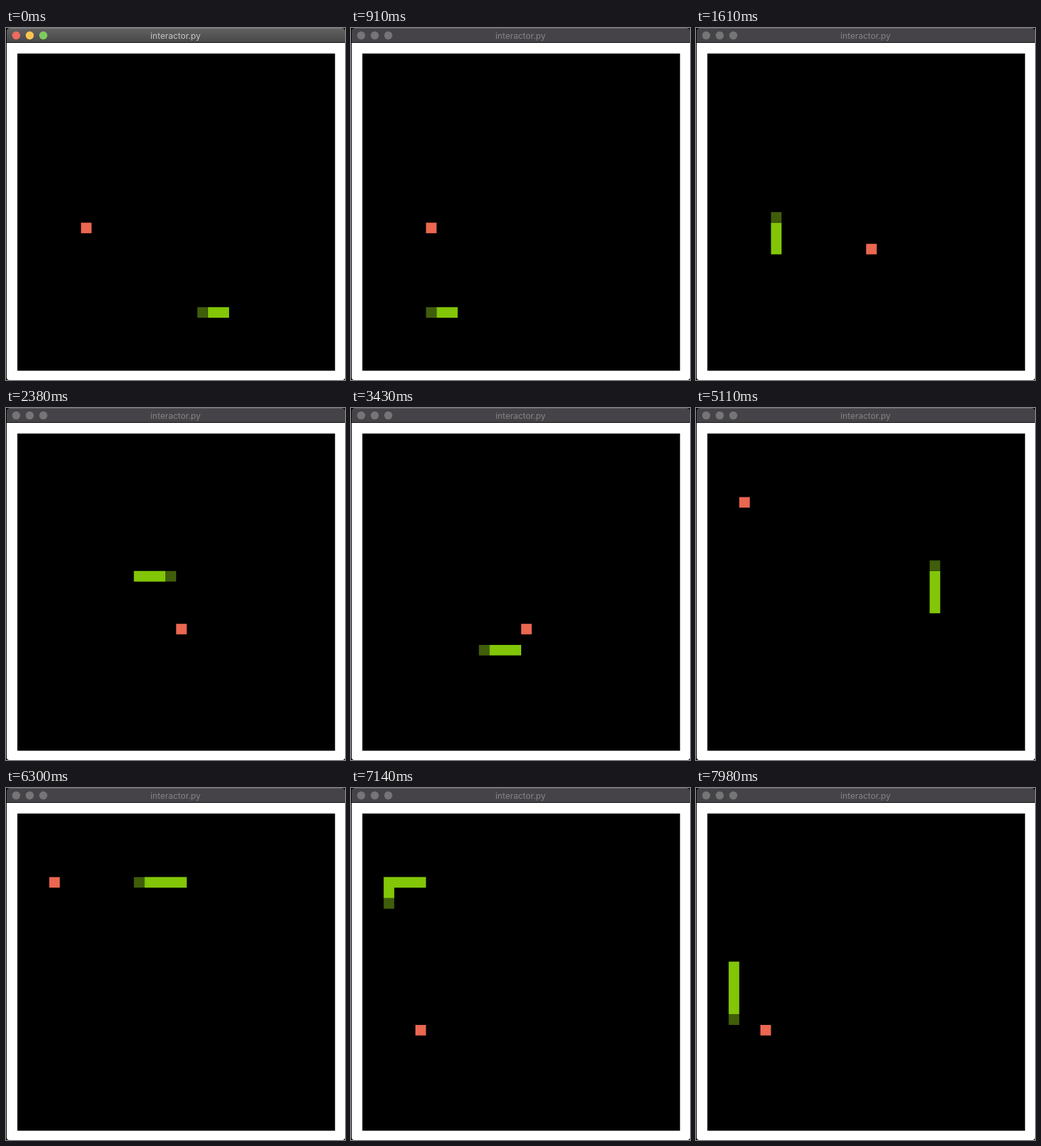
These frames come from a looping animation (500 by 520 pixels, 8000 ms). An HTML page:

```html
<!DOCTYPE html>
<html lang="en">
<head>
<meta charset="utf-8">
<title>interactor.py</title>
<style>
  html, body { margin: 0; width: 100%; height: 100%; overflow: hidden; background: #000; }
  svg { display: block; width: 500px; height: 520px; }
  text { font: 12.5px Inter, Roboto, sans-serif; text-anchor: middle; fill: #c6c6c6; }
  #bar { fill: url(#shine); }
  .idle #bar { fill: #454347; }
  .idle #edge { stroke: #636165; }
  .idle text { fill: #848385; }
  .idle circle { fill: #757477; }
</style>
</head>
<body>
<svg id="window" viewBox="0 0 500 520">
  <defs>
    <linearGradient id="shine" x2="0" y2="1">
      <stop stop-color="#626262"/>
      <stop offset="1" stop-color="#484848"/>
    </linearGradient>
  </defs>
  <path d="M1 20H500V516Q500 520 496 520H5Q1 520 1 516Z" fill="#fff"/>
  <path id="bar" d="M1 21V5Q1 0 6 0H495Q500 0 500 5V21Z"/>
  <path id="edge" d="M5 .5H496" stroke="#7c7c7c"/>
  <path d="M1 21.5H500" stroke="#111"/>
  <circle cx="15" cy="11" r="6" fill="#ed6b5f"/>
  <circle cx="35" cy="11" r="6" fill="#f8c650"/>
  <circle cx="55" cy="11" r="6" fill="#7fcb5f"/>
  <text x="250" y="16">interactor.py</text>
  <rect x="16.7" y="37.7" width="468.6" height="468.6"/>
  <g transform="translate(17 38) scale(15.6)">
    <rect id="food" width="1" height="1" fill="#ea6750"/>
    <polyline id="body" fill="none" stroke="#82c607" stroke-width="1" stroke-linecap="square"/>
    <rect id="head" width="1" height="1" fill="#405d0a"/>
  </g>
</svg>
<script>
const LOOP = 8000, TICK = 70;
const ROUTE = 'L11 U11 R10 D7 L7 U2 R12 U12 L19 D13';
const STEP = { L: [-1, 0], R: [1, 0], U: [0, -1], D: [0, 1] };
const START_LENGTH = 3;
const PAUSES = [4, 11, 16, 28, 37, 41, 50, 60, 81, 93, 104]; // ticks without a move
const DOUBLE = 38;                                           // tick with two moves
const FOODS = [[6, 16], [15, 18], [3, 6], [5, 20]];
const EATEN_AT = [19, 54, 90];                               // move counts

const cells = [[19, 24], [18, 24], [17, 24]];
for (const leg of ROUTE.split(' ')) {
  const [dx, dy] = STEP[leg[0]];
  for (let i = 0; i < +leg.slice(1); i++) {
    const [x, y] = cells[cells.length - 1];
    cells.push([x + dx, y + dy]);
  }
}

const $ = id => document.getElementById(id);
const countUpTo = (list, n) => list.filter(v => v <= n).length;

function place(el, [x, y]) {
  el.setAttribute('x', x);
  el.setAttribute('y', y);
}

function draw(tick) {
  const moves = tick - countUpTo(PAUSES, tick) + (tick >= DOUBLE ? 1 : 0);
  const eaten = countUpTo(EATEN_AT, moves);
  const head = moves + START_LENGTH - 1;
  const body = cells.slice(head + 1 - START_LENGTH - eaten, head);

  place($('food'), FOODS[eaten]);
  place($('head'), cells[head]);
  $('body').setAttribute('points', body.map(([x, y]) => `${x + 0.5},${y + 0.5}`).join(' '));
  $('window').classList.toggle('idle', tick > 0);
}

let start, shown;
function frame(now) {
  start ??= now;
  const tick = Math.floor(((now - start) % LOOP) / TICK);
  if (tick !== shown) draw(shown = tick);
  requestAnimationFrame(frame);
}
draw(0);
requestAnimationFrame(frame);
</script>
</body>
</html>
```
